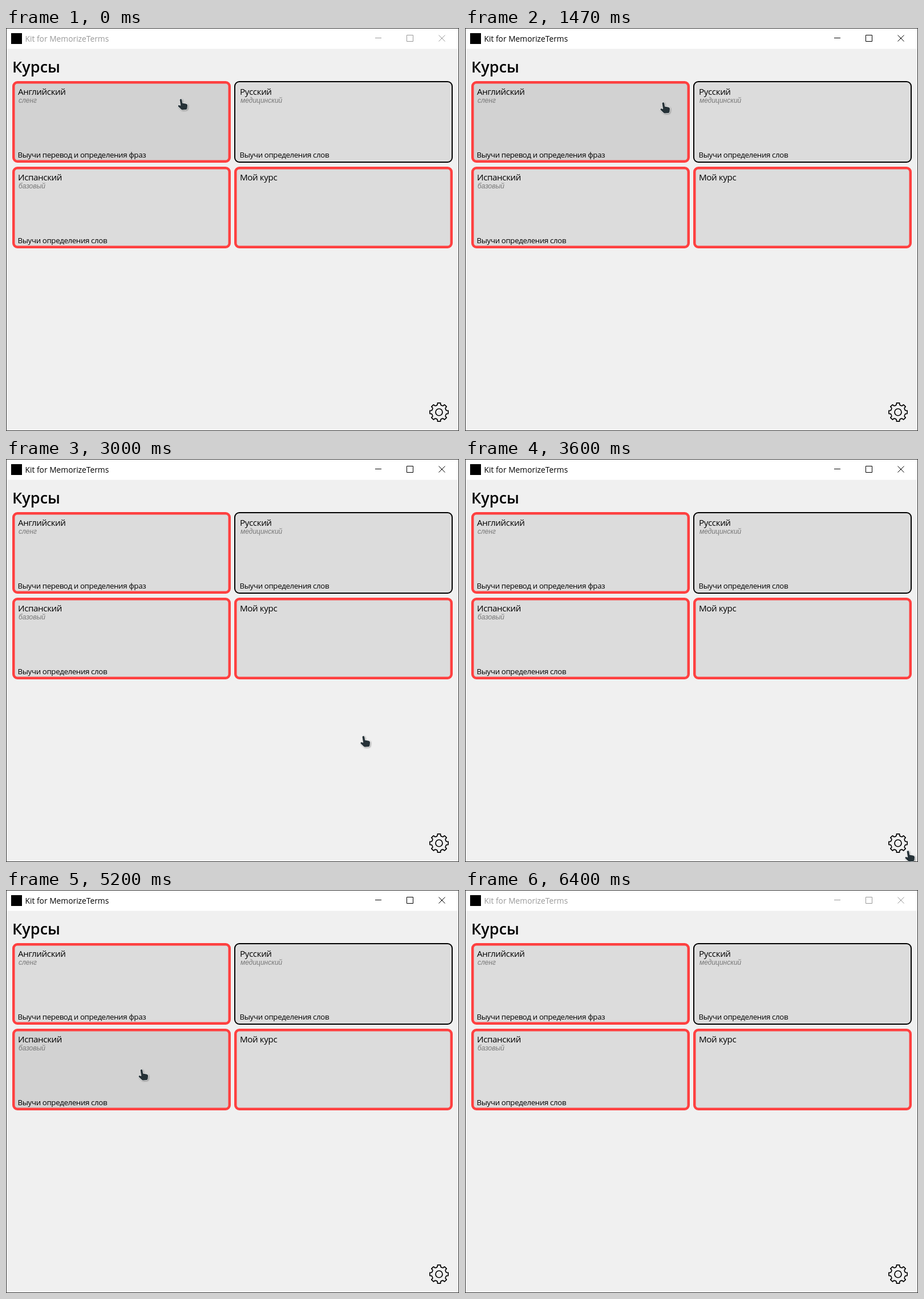
Recreate the animation shown at these times as an HTML page. Size 794x706 px, loop 6540 ms.

```html
<!DOCTYPE html>
<html lang="ru">
<head>
<meta charset="utf-8">
<title>Курсы</title>
<style>
  html, body { margin: 0; width: 100%; height: 100%; overflow: hidden; background: #f0f0f0; }
  svg { display: block; width: 794px; height: 706px; font-family: "Open Sans", sans-serif; }
  .caption { font-size: 13.8px; fill: #000; }
  .controls { fill: none; stroke: #000; }
  .idle .caption { fill: #999; }
  .idle .controls { stroke: #999; }
  .heading { font-size: 27px; font-weight: 600; }
  .card rect { fill: #dcdcdc; stroke: #ff4040; stroke-width: 4.5; }
  .card.plain rect { stroke: #000; stroke-width: 2; }
  .card.hover rect { fill: #d2d2d2; }
  .card.press rect { fill: #c6c6c6; stroke: #d83838; }
  .name { font-size: 15.2px; letter-spacing: -.4px; }
  .kind { font: italic 12px "Liberation Sans", sans-serif; fill: #777; }
  .task { font-size: 13.3px; letter-spacing: -.37px; }
  .gear { fill: none; stroke: #000; stroke-width: 1.7; stroke-linejoin: round; }
  #gearBox { fill: none; }
  #gearBox.hover { fill: #dcdcdc; }
  #gearBox.press { fill: #cacaca; }
  #hand { filter: drop-shadow(1px 1px 1px rgba(0, 0, 0, .35)); }
  #hand path { fill: #263238; stroke: #fff; stroke-width: 1.5; stroke-linejoin: round; paint-order: stroke; }
</style>
</head>
<body>
<svg id="app" class="idle" viewBox="0 0 794 706">
  <rect width="794" height="706" fill="#f0f0f0"/>
  <rect width="794" height="36.5" fill="#fff"/>
  <rect x="9" y="9" width="19" height="19" fill="#000"/>
  <text class="caption" x="33.5" y="24">Kit for MemorizeTerms</text>
  <path class="controls" d="M647 17.5h11M702.5 12.5h11v11h-11zM758.5 12.5l11 11m0-11l-11 11"/>
  <text class="heading" x="11" y="78">Курсы</text>
  <g id="cards"></g>
  <rect id="gearBox" x="737" y="652" width="46" height="43" rx="7"/>
  <path id="gear" class="gear" transform="translate(759 673)"/>
  <circle class="gear" cx="759" cy="673" r="6"/>
  <rect x=".5" y=".5" width="793" height="705" fill="none" stroke="#333"/>
  <g id="hand"><path d="M4.6 3.2C4.2 1 7.6 .4 8.2 2.6L9.2 8.4L15.8 9.8Q18.2 10.4 18.1 12.8L17.5 18Q17.2 19.8 15.5 19.9L9.3 20.4Q8 20.4 7 19.5L1.5 14.2Q1.2 12.6 2.8 12.1L6.2 12.9Z"/></g>
</svg>
<script>
const LOOP = 6540, TICK = 1000 / 15;
const W = 383, H = 143;
const $ = id => document.getElementById(id);

const cards = [
  { name: 'Английский', kind: 'сленг', task: 'Выучи перевод и определения фраз' },
  { name: 'Русский', kind: 'медицинский', task: 'Выучи определения слов', plain: true },
  { name: 'Испанский', kind: 'базовый', task: 'Выучи определения слов' },
  { name: 'Мой курс', kind: '', task: '' }
].map((card, i) => ({ ...card, x: 11 + i % 2 * (W + 6), y: 93 + (i >> 1) * (H + 7) }));

$('cards').innerHTML = cards.map(({ x, y, name, kind, task, plain }) => {
  const inset = plain ? 1 : 2.25;
  return `<g class="card${plain ? ' plain' : ''}">
    <rect x="${x + inset}" y="${y + inset}" width="${W - 2 * inset}" height="${H - 2 * inset}" rx="${9 - inset}"/>
    <text class="name" x="${x + 10}" y="${y + 24}">${name}</text>
    <text class="kind" x="${x + 11}" y="${y + 38}">${kind}</text>
    <text class="task" x="${x + 9.5}" y="${y + 134}">${task}</text></g>`;
}).join('');
const cardNodes = [...$('cards').children];

function gearPath(teeth, outer, inner) {
  const at = (r, deg) => {
    const a = deg * Math.PI / 180;
    return `${r * Math.sin(a)} ${-r * Math.cos(a)}`;
  };
  const step = 360 / teeth;
  let d = '';
  for (let a = 0; a < 360; a += step) {
    d += `${a ? 'L' : 'M'}${at(inner + 1, a - 12)}L${at(outer, a - 9)}L${at(outer, a + 9)}` +
         `L${at(inner + 1, a + 12)}Q${at(inner - .5, a + step / 2)} ${at(inner + 1, a + step - 12)}`;
  }
  return d + 'Z';
}
$('gear').setAttribute('d', gearPath(8, 16.3, 12.4));

// Ticks of arrival and departure, place, sideways bend of the way there
const stops = [
  [0, 0, 300, 123],
  [11, 11, 484, 191, 1],
  [20, 36, 341, 129, -.65],
  [37, 37, 339, 133],
  [46, 46, 655, 528],
  [51, 53, 763, 672],
  [54, 54, 770, 685],
  [57, 64, 764, 674],
  [71, 72, 729, 571],
  [73, 75, 734, 634],
  [78, 78, 231, 313],
  [85, 85, 213, 634, .25],
  [88, 88, 152, 706]
];

function pointer(k) {
  const i = stops.findIndex(s => s[0] > k);
  if (i < 0) return null;
  const [, leave, x, y] = stops[i - 1];
  const [arrive, , x2, y2, bend = 0] = stops[i];
  const f = Math.max(0, (k - leave) / (arrive - leave));
  const side = bend * 4 * f * (1 - f), dx = x2 - x, dy = y2 - y;
  return [x + dx * f - dy * side, y + dy * f + dx * side];
}
const within = (v, from, to) => v >= from && v < to;

function draw(now) {
  const k = Math.floor(now % LOOP / TICK + .06);
  const p = pointer(k);
  $('app').classList.toggle('idle', !within(k, 22, 96));
  $('hand').style.display = p ? '' : 'none';
  if (p) $('hand').setAttribute('transform', `translate(${p.map(Math.round)})`);

  cards.forEach(({ x, y }, i) => {
    const over = !!p && within(p[0] + 6, x, x + W) && within(p[1] + 2, y, y + H);
    cardNodes[i].classList.toggle('hover', over);
    cardNodes[i].classList.toggle('press', over && within(k, 23, 28));
  });
  $('gearBox').classList.toggle('hover', within(k, 50, 54) || within(k, 56, 73));
  $('gearBox').classList.toggle('press', within(k, 57, 62));
}

const start = performance.now();
(function frame() {
  draw(performance.now() - start);
  requestAnimationFrame(frame);
})();
</script>
</body>
</html>
```
